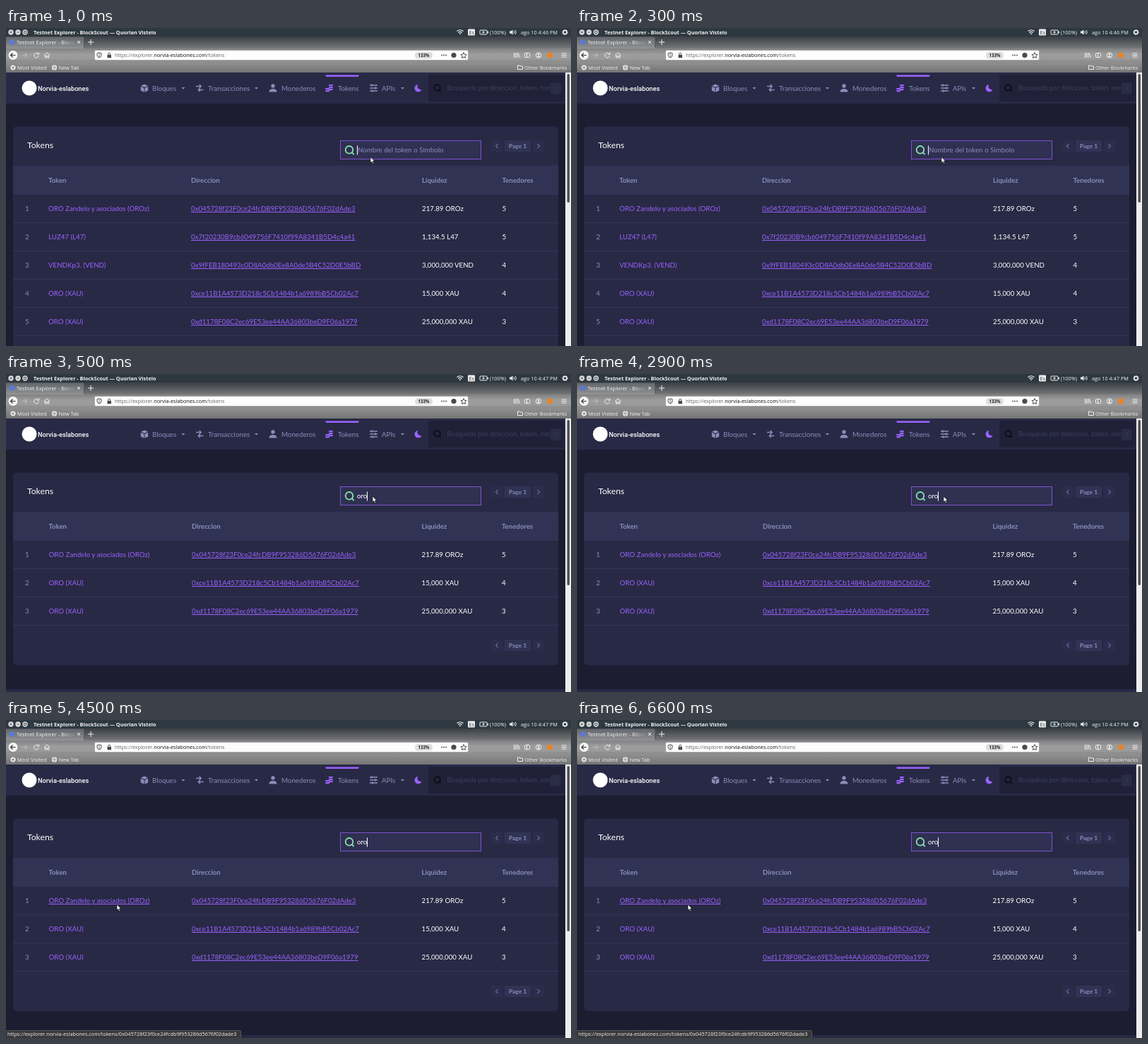
An HTML page for the animation above (8 s loop, 800 px wide and 450 px high).

```html
<!DOCTYPE html>
<html lang="es">
<head>
<meta charset="utf-8">
<title>Token search</title>
<style>
  html, body { margin: 0; width: 100%; height: 100%; overflow: hidden; background: #1c1d31; }
  svg { display: block; width: 800px; height: 450px; }
  text { white-space: pre; }
  .ui { font: 7.3px "Open Sans", "Noto Sans", sans-serif; fill: #f2f2f2; }
  .page { font: 9.73px Lato, sans-serif; fill: #fff; }
  .muted { fill: #8a8dba; }
  .head { font-weight: 700; font-size: 9.6px; fill: #8a8dba; }
  .link { fill: #9b62ff; }
  .underlined { text-decoration: underline; text-decoration-thickness: .7px; text-underline-offset: 1.4px; }
  .hash { fill: #9b62ff; text-decoration: underline dotted #8456da; text-decoration-thickness: .8px; text-underline-offset: 1.4px; }
  .line { fill: none; stroke: #f2f2f2; stroke-width: 1; }
  .ink { fill: none; stroke: #4a4a4c; stroke-width: 1; }
</style>
</head>
<body>
<svg id="stage" viewBox="0 0 800 450"></svg>
<script>
const LOOP = 8000;
const CARD = '#282945', PANEL = '#313355', MUTED = '#8a8dba', PURPLE = '#9b62ff';
const LIGHT = '#f2f2f2', INK = '#4a4a4c', TITLE_BAR = '#2d3840';
const SITE = 'norvia-eslabones.com';

const rect = (x, y, w, h, fill, extra = '') =>
  `<rect x="${x}" y="${y}" width="${w}" height="${h}" fill="${fill}" ${extra}/>`;
const circle = (x, y, r, fill, extra = '') =>
  `<circle cx="${x}" cy="${y}" r="${r}" fill="${fill}" ${extra}/>`;
const path = (d, extra = 'class="line"') => `<path d="${d}" ${extra}/>`;
const text = (x, y, value, cls = 'page', extra = '') =>
  `<text x="${x}" y="${y}" class="${cls}" ${extra}>${value}</text>`;
const ui = (x, y, value, extra) => text(x, y, value, 'ui', extra);
const stroke = (color, width = 1) => `fill="none" stroke="${color}" stroke-width="${width}"`;
const solid = color => `fill="${color}"`;
const ink = 'class="ink"';

const gear = (x, y, r) => circle(x, y, r, 'none', `stroke="${LIGHT}" stroke-width="1.5"`) +
  circle(x, y, r + 1, 'none', `stroke="${LIGHT}" stroke-width="1.2" stroke-dasharray="1.3 1.3"`);

const gradients = `<defs>
  <linearGradient id="chrome" x2="0" y2="1">
    <stop offset="0" stop-color="#3a3f45"/><stop offset=".32" stop-color="#737476"/>
    <stop offset=".5" stop-color="#959595"/><stop offset=".75" stop-color="#8d8d8d"/>
    <stop offset="1" stop-color="#747474"/>
  </linearGradient>
  <linearGradient id="fade" gradientUnits="userSpaceOnUse" x1="80" x2="99">
    <stop offset="0" stop-color="${LIGHT}"/><stop offset="1" stop-color="${LIGHT}" stop-opacity="0"/>
  </linearGradient>
</defs>`;

function titleBar() {
  const buttons = [7, 17, 27].map((x, i) => circle(x, 6, 3.7, '#dcdcdc') + path([
    `M${x - 1.4} 4.6l2.8 2.8m0-2.8l-2.8 2.8`, `M${x - 1.7} 6h3.4`, `M${x - 1.5} 4.5h3v3h-3z`
  ][i], stroke(TITLE_BAR, .8))).join('');
  return rect(0, 0, 800, 12, TITLE_BAR) + buttons +
    ui(39, 8.8, 'Testnet Explorer - BlockScout — Quorlan Vistelo', 'style="font-weight:700"') +
    path('M638.5 4.5Q643 1 647.5 4.5M640.3 6.4Q643 4.4 645.7 6.4', stroke(LIGHT, 1.2)) +
    path('M641.4 7.5h3.2l-1.6 2z', solid(LIGHT)) +
    rect(654, 1.5, 10, 9, LIGHT, 'rx="1"') + ui(655.5, 8.6, 'Es', `style="fill:${TITLE_BAR}"`) +
    rect(671, 3, 10, 6, 'none', `rx="1" stroke="${LIGHT}"`) + rect(681.5, 4.7, 1.5, 2.6, LIGHT) +
    path('M674 6h4m-2-2v4', stroke(LIGHT, .9)) + ui(685, 8.8, '(100%)') +
    path('M713 4.5h2l2.5-2v7l-2.5-2h-2z', solid(LIGHT)) +
    path('M719 4.3q1.4 1.7 0 3.4M721 3q2.6 3 0 6') + gear(791.5, 6, 2.5);
}

function tabBar() {
  return rect(0, 12, 800, 51, 'url(#chrome)') + rect(0, 12.5, 110, 16.5, '#fff', 'opacity=".2"') +
    circle(8.5, 20, 3.8, '#5b78d8') +
    ui(15, 22.8, 'Testnet Explorer - BlockScout', 'style="fill:url(#fade);font-size:7.5px"') +
    path('M101 18l4 4m0-4l-4 4M120 16v8m-4-4h8') + path('M110.5 14v13', stroke('#55575a'));
}

function toolBar() {
  const library = 'M719.5 35v7m2.3-7v7m2.2-7v7m1.4-6.5l2 6.5';
  const address = `<tspan fill="#666">https://explorer.</tspan><tspan fill="#111">${SITE}</tspan><tspan fill="#666">/tokens</tspan>`;
  return rect(0, 28.5, 800, 16.5, '#fff', 'opacity=".08"') +
    circle(10, 38.5, 7, '#f4f4f4', 'stroke="#777" stroke-width=".7"') +
    path('M13.5 38.5h-7m3-3l-3 3l3 3', stroke('#333', 1.2)) +
    path('M22.5 38.5h7m-3-3l3 3l-3 3', stroke('#b8b8b8', 1.1)) +
    path('M45.7 36.5a3.4 3.4 0 1 0 .6 3M46.5 34.4v2.8h-2.8') +
    path('M54 38.5l4-3.7l4 3.7M55.3 38v4h1.8v-2.5h1.8v2.5h1.8v-4') +
    rect(125.5, 31.5, 529, 14, '#fdfdfd', 'rx="2" stroke="#a8a8a8"') +
    path('M132 34.8l3 1v2.3q0 3-3 4q-3-1-3-4v-2.3z', ink) + path('M132 36v5', stroke(INK, .8)) +
    rect(143.5, 38, 5.5, 4.2, INK, 'rx=".6"') + path('M144.7 38v-1.2a1.5 1.5 0 0 1 3 0v1.2', ink) +
    ui(154, 41.3, address) + rect(579, 34, 25, 9.5, '#dedede', 'rx="4.5"') +
    ui(591.5, 41, '133%', 'text-anchor="middle" style="font-size:6.1px;font-weight:700;fill:#222"') +
    [617, 620, 623].map(x => circle(x, 38.5, .9, INK)).join('') + circle(634, 38.5, 3.6, INK) +
    path('M648 34.6l1.2 2.7 2.9.3-2.2 2 .6 2.9-2.5-1.5-2.5 1.5.6-2.9-2.2-2 2.9-.3z', ink) +
    path(library) + rect(734.5, 35.5, 7, 6, 'none', `rx="1" stroke="${LIGHT}"`) + path('M737.5 35.5v6') +
    circle(754, 38.5, 3.7, 'none', `stroke="${LIGHT}"`) + circle(754, 37.5, 1.3, LIGHT) +
    path('M751.7 41q2.3-2.8 4.6 0', solid(LIGHT)) + circle(770, 38.5, 4, '#e8832a') +
    path('M786.5 36h7m-7 2.5h7m-7 2.5h7') +
    gear(10, 56, 2.3) + ui(16, 58.6, 'Most Visited') +
    circle(68.5, 56, 3.7, LIGHT) + path('M65 56h7m-3.5-3.5q-2.6 3.5 0 7q2.6-3.5 0-7', stroke('#858585', .7)) +
    ui(74.5, 58.6, 'New Tab') +
    path('M724.5 58.5v-5.5h2.6l.8 1h3.6v4.5z') + ui(734, 58.6, 'Other Bookmarks');
}

function navBar() {
  const labels = [[207, 'Bloques'], [286, 'Transacciones'], [390, 'Monederos'], [470, 'Tokens'], [532, 'APIs']];
  const coins = [[457, 80], [457, 83], [457, 86], [452.3, 85], [452.3, 88]];
  const coin = ([x, y]) => `M${x} ${y}h5.8v1.7q-2.9 1.2-5.8 0z`;
  return rect(0, 63, 792, 44, CARD) + circle(33, 85, 10.5, '#fff') +
    text(45, 88.6, 'Norvia-eslabones', '', 'fill="#fff" style="font:500 9.2px Roboto,sans-serif"') +
    labels.map(([x, label]) => text(x, 88.7, label, 'page muted')).join('') +
    [251, 354.5, 561.5].map(x => path(`M${x - 2.5} 84h5l-2.5 2.8z`, solid(MUTED))).join('') +
    path('M196 79.5l5 2.2l-5 2.3l-5-2.3zM190.8 82.8l4.7 2.2v5.7l-4.7-2.3zM201.2 82.8l-4.7 2.2v5.7l4.7-2.3z', solid(MUTED)) +
    path('M279.5 87.5h-7m2.3-2.5l-2.5 2.5l2.5 2.5M269 82.5h7m-2.3-2.5l2.5 2.5l-2.5 2.5', stroke(MUTED, 1.5)) +
    circle(378, 82, 2.7, MUTED) + path('M372.5 90.5q0-4.5 5.5-4.5t5.5 4.5z', solid(MUTED)) +
    path('M452.5 66.5h47v1q0 1.5-1.5 1.5h-44q-1.5 0-1.5-1.5z', solid(PURPLE)) +
    path(coins.map(coin).join(''), solid(PURPLE)) +
    path('M515 81h11m-11 4h11m-11 4h11M518 79.3v3.4m5 .6v3.4m-4 .6v3.4', stroke(MUTED, 1.4)) +
    path('M583 80a5.2 5.2 0 1 0 5.5 7.2a5 5 0 0 1-5.5-7.2z', solid(PURPLE)) +
    rect(598, 66, 192, 38, '#202138', 'rx="2"') +
    circle(610.5, 84.5, 4.2, 'none', 'stroke="#08080d" stroke-width="1.5"') + path('M613.5 87.7l2 2', stroke('#08080d', 1.5)) +
    '<clipPath id="query"><rect x="620" y="70" width="151" height="30"/></clipPath>' +
    text(624.5, 87.8, 'Busqueda por direccion, token, nombre', 'page', 'clip-path="url(#query)" style="fill:#3d3f5c;font-size:9.6px"') +
    rect(771, 77.5, 15, 16, '#2a2b47', 'rx="2"') + text(776.5, 88.5, '/', 'page', 'style="fill:#3d3f5c"');
}

function pager(y) {
  return rect(687, y - 8, 16, 16, '#2c2d4c', 'rx="2"') + rect(706, y - 8, 37, 16, PANEL, 'rx="2"') +
    rect(746, y - 8, 16, 16, '#2c2d4c', 'rx="2"') +
    path(`M696.5 ${y - 3}l-3 3l3 3M752.5 ${y - 3}l3 3l-3 3`, stroke('#696c98', 1.1)) +
    text(724.5, y + 3, 'Page 1', 'page head', 'text-anchor="middle" style="font-size:8.4px"');
}

const tokens = [
  ['ORO Zandelo y asociados (OROz)', '0x045728f23F0ce24fcDB9F953286D5676F02dAde3', '217.89 OROz', 5],
  ['LUZ47 (L47)', '0x7f20230B9cb6049756F7410f99A8341B5D4c4a41', '1,134.5 L47', 5],
  ['VENDKp3. (VEND)', '0x9fFEB180493c0D8A0db0Ee8A0de5B4C52D0E5bBD', '3,000,000 VEND', 4],
  ['ORO (XAU)', '0xce11B1A4573D218c5Cb1484b1a6989bB5Cb02Ac7', '15,000 XAU', 4],
  ['ORO (XAU)', '0xd1178F08C2ec69E53ee44AA36803beD9F06a1979', '25,000,000 XAU', 3]
];

function tokenCard({ query, hover }) {
  const rows = query ? tokens.filter(([name]) => name.startsWith('ORO ')) : tokens;
  const columns = query ? [60.5, 263, 588.5, 702] : [60, 262, 589, 702.5];
  const classes = ['page link', 'page hash', 'page', 'page'];
  const heads = ['Token', 'Direccion', 'Liquidez', 'Tenedores'];
  const cell = (value, row, column) => text(columns[column], 259 + row * 40, value,
    classes[column] + (hover && row + column === 0 ? ' underlined' : ''));
  const body = rows.map((row, i) => text(27, 259 + i * 40, i + 1, 'page muted') +
    row.map((value, column) => cell(value, i, column)).join('') +
    rect(10, 275 + i * 40, 772, 1, '#343656')).join('');
  const caret = query ? 511 : 497;
  return rect(10, 139.5, 772, query ? 272.5 : 330, CARD, 'rx="5"') +
    text(30, 170, 'Tokens', 'page', 'style="font-size:12.2px"') +
    rect(473.5, 159.5, 199, 26, '#2f3052', 'stroke="#7d53cc"') +
    circle(486, 172.3, 5.3, 'none', 'stroke="#87e1a9" stroke-width="1.8"') +
    path('M489.8 176.2l2.8 2.8', stroke('#87e1a9', 1.8)) +
    text(query ? 497 : 498, 176, query || 'Nombre del token o Simbolo', query ? 'page' : 'page muted') +
    rect(caret, 166.5, 1, 13, '#fff') + pager(167) +
    rect(10, 195, 772, 41, PANEL) +
    heads.map((label, c) => text(columns[c], 219, label, 'page head')).join('') + body +
    (query ? pager(384) + rect(0, 446, 792, 4, CARD) : '');
}

function statusBar() {
  const link = `https://explorer.${SITE}/tokens/${tokens[0][1].toLowerCase()}`;
  return rect(-1, 439.5, 333.5, 12, '#38383b', 'rx="1" stroke="#58585c"') + ui(2, 447.4, link);
}

const pointer = (x, y) => path(`M${x} ${y}v8.2l1.9-1.7l1.3 2.9l1.4-.6l-1.3-2.8h2.6z`,
  'fill="#fff" stroke="#111" stroke-width=".7"');

const scenes = [
  { start: 0, clock: '4:46', query: '', thumb: 182, mouse: [516, 182.5] },
  { start: 500, clock: '4:47', query: 'oro', thumb: 234, mouse: [519, 173] },
  { start: 4500, clock: '4:47', query: 'oro', thumb: 234, mouse: [157, 261], hover: true }
];

const sceneMarkup = scene => `<g visibility="hidden">${
  ui(729, 8.8, `ago 10 ${scene.clock} PM`) + tokenCard(scene) +
  rect(792, 63, 8, 387, '#ededed') + rect(794.5, 65, 3.5, scene.thumb, '#505050', 'rx="1.7"') +
  (scene.hover ? statusBar() : '') + pointer(...scene.mouse)}</g>`;

const stage = document.getElementById('stage');
stage.innerHTML = gradients + rect(0, 0, 800, 450, '#1c1d31') + titleBar() + tabBar() + toolBar() + navBar() +
  scenes.map(sceneMarkup).join('');
const groups = [...stage.children].slice(-scenes.length);

const origin = performance.now();
function draw() {
  const time = (performance.now() - origin) % LOOP;
  const current = scenes.findLastIndex(scene => time >= scene.start);
  groups.forEach((group, i) => group.setAttribute('visibility', i === current ? 'visible' : 'hidden'));
  requestAnimationFrame(draw);
}
draw();
</script>
</body>
</html>
```
